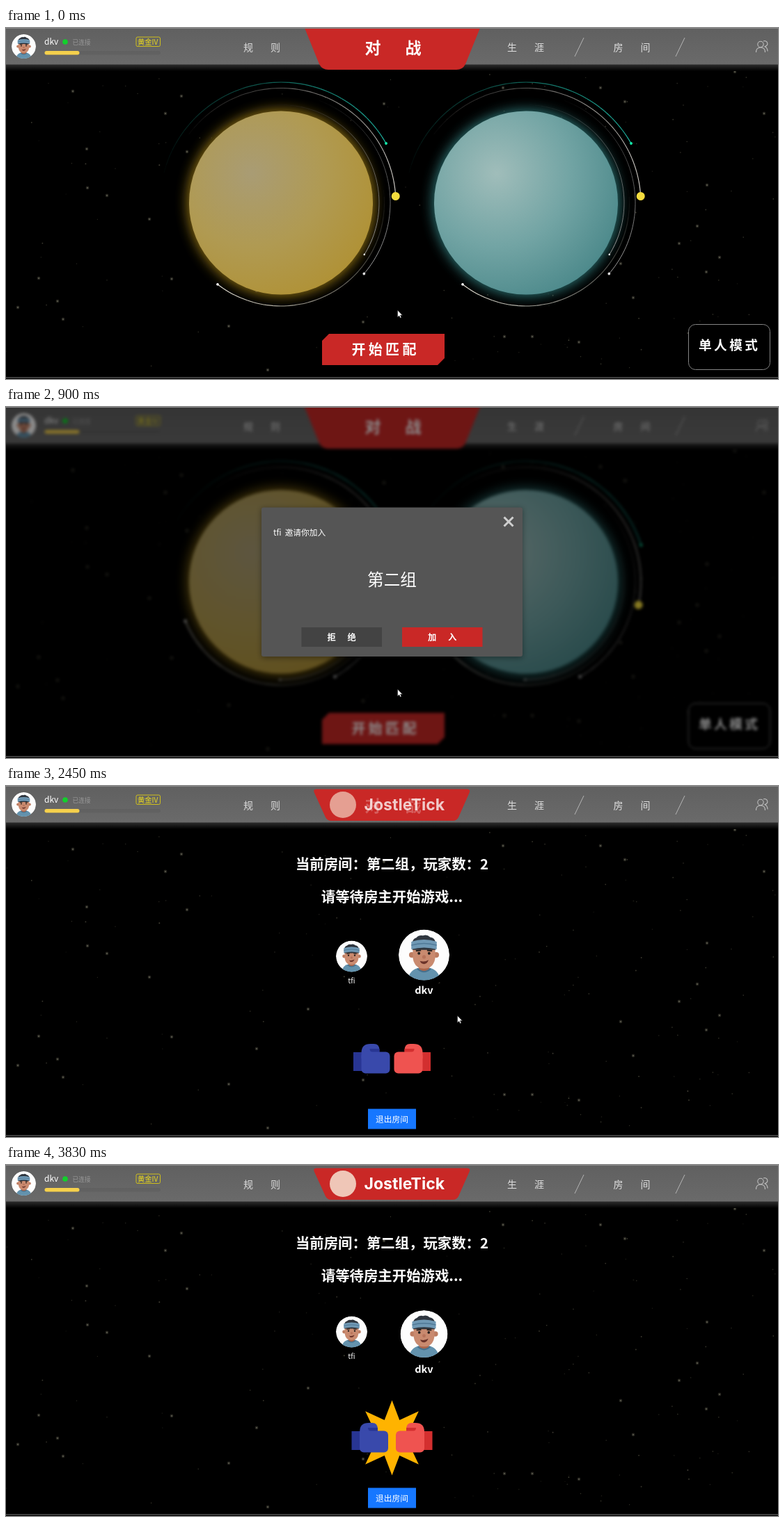
Recreate the animation shown at these times as an HTML page. Size 1109x505 px, loop 3880 ms.

```html
<!DOCTYPE html>
<html lang="zh-CN">
<head>
<meta charset="utf-8">
<title>对战大厅</title>
<style>
html, body { margin: 0; width: 100%; height: 100%; overflow: hidden; background: #000; }
svg { display: block; width: 1109px; height: 505px; }
text { font-family: "Noto Sans CJK SC", "Noto Sans CJK", "Noto Sans", sans-serif; fill: #fff; }
.bold { font-weight: 700; }
.mid { text-anchor: middle; }
.nav { font-size: 14px; font-weight: 300; fill: #dedede; letter-spacing: 25px; }
</style>
</head>
<body>
<svg id="stage" viewBox="0 0 1109 505" xmlns="http://www.w3.org/2000/svg"></svg>
<script>
const LOOP = 3880, OPEN = 600, ENTER = 2200;
const CX = 554.5, CY = 251.5;
const me = 'dkv', host = 'tfi', brand = 'JostleTick';
const RED = '#c92826';

const clamp = v => Math.max(0, Math.min(1, v));
const ramp = (t, from, length) => clamp((t - from) / length);
const easeOut = (u, power) => 1 - (1 - u) ** power;
const smooth = u => u * u * (3 - 2 * u);
const wave = (t, period) => (1 - Math.cos(2 * Math.PI * t / period)) / 2;

const text = (x, y, size, str, extra = '') =>
  `<text x="${x}" y="${y}" font-size="${size}" ${extra}>${str}</text>`;
const rect = (x, y, w, h, fill, extra = '') =>
  `<rect x="${x}" y="${y}" width="${w}" height="${h}" fill="${fill}" ${extra}/>`;
const circle = (x, y, r, fill, extra = '') =>
  `<circle cx="${x}" cy="${y}" r="${r}" fill="${fill}" ${extra}/>`;
const path = (d, extra) => `<path d="${d}" ${extra}/>`;
const polar = (r, deg) => {
  const a = deg * Math.PI / 180;
  return `${(r * Math.cos(a)).toFixed(2)} ${(r * Math.sin(a)).toFixed(2)}`;
};

// Background stars: the bright ones placed, the faint ones scattered.
const bright = [96,91, 229,123, 260,178, 206,275, 145,241, 434,321, 320,429, 714,86, 854,86,
  889,106, 1089,123, 993,285, 883,339, 716,444, 756,444, 513,423, 17,402, 74,393, 82,419,
  117,230, 116,174, 360,378, 1006,351, 1007,226, 823,452, 967,310, 238,361, 47,360, 252,98,
  543,109, 376,492, 901,388, 1047,63, 1025,330];
function stars() {
  let out = '', seed = 7;
  const rnd = () => (seed = seed * 16807 % 2147483647) / 2147483647;
  for (let i = 0; i < bright.length; i += 2) {
    const [x, y] = [bright[i], bright[i + 1]];
    out += circle(x, y, 2.4, '#8a8672', 'opacity=".25"') + circle(x, y, 0.8, '#8c8974');
  }
  for (let i = 0; i < 150; i++) {
    out += circle((rnd() * 1109).toFixed(1), (60 + rnd() * 440).toFixed(1),
      (0.5 + rnd() * 0.5).toFixed(2), '#7a7660', `opacity="${(0.2 + rnd() * 0.35).toFixed(2)}"`);
  }
  return out;
}

// Orbits: radius, starting angle, degrees per second, tail length, look of line and dot.
const orbits = [
  { r: 173.5, start: -29.5, speed: 13.1, tail: 136, line: '#1fb5a2', width: 1.2, dot: 2, fill: '#12e3a4' },
  { r: 165, start: -3.3, speed: 16.6, tail: 140, line: '#e0dcd6', width: 1.1, dot: 6, fill: '#f4dc3e' },
  { r: 157, start: 40.5, speed: 22.1, tail: 110, line: '#aaa', width: 0.9, dot: 1.9, fill: '#ddd' },
  { r: 148.5, start: 127.8, speed: 33.2, tail: 135, line: '#e8e4d8', width: 1.1, dot: 1.8, fill: '#fff' },
  { r: 141, start: 31.8, speed: 65.3, tail: 120, line: '#999', width: 0.9, dot: 1.3, fill: '#eee' }
];
function orbit(o, i) {
  const n = 36, step = o.tail / n;
  let out = '';
  for (let k = 0; k < n; k++) {
    out += path(`M${polar(o.r, -k * step)}A${o.r} ${o.r} 0 0 0 ${polar(o.r, -(k + 1) * step)}`,
      `fill="none" stroke="${o.line}" stroke-width="${o.width}" opacity="${(1 - k / n).toFixed(2)}"`);
  }
  return `<g class="orbit" data-i="${i}">${out}${circle(o.r, 0, o.dot, o.fill)}</g>`;
}
const planet = (x, id, glow) => `<g transform="translate(${x} ${CY})">
  ${circle(0, 0, 134, glow, 'filter="url(#glow)" opacity=".75"')}
  ${circle(0, 0, 132, `url(#${id})`)}${orbits.map(orbit).join('')}</g>`;
const planetFill = (id, a, b, c) => `<radialGradient id="${id}" cx=".34" cy=".34" r=".8">
  <stop stop-color="${a}"/><stop offset=".5" stop-color="${b}"/><stop offset="1" stop-color="${c}"/></radialGradient>`;

// Portrait in a 100-unit box, centred on the origin.
const portrait = `<g id="portrait" clip-path="url(#disc)">
  ${circle(0, 0, 50, '#fdfdfd')}
  ${path('M-32 54Q-31 29 -9 25H9Q31 29 32 54Z', 'fill="#6392ad"')}
  ${path('M-10 18H10V28Q0 36 -10 28Z', 'fill="#a9654b"')}
  ${path('M-13 27Q0 39 13 27', 'fill="none" stroke="#47708c" stroke-width="3"')}
  ${circle(-24, 0, 5.5, '#bd7c61')}${circle(24, 0, 5.5, '#bd7c61')}
  ${path('M-22 -16H22V6Q19 27 0 27Q-19 27 -22 6Z', 'fill="#c98a6f"')}
  ${path('M-23 -24Q-22 -32 -15 -34Q-10 -40 -2 -38Q6 -41 12 -35Q21 -34 23 -24V-10H-23Z', 'fill="#2f363f"')}
  ${path('M-25 -26Q0 -34 25 -26V-11Q0 -18 -25 -11Z', 'fill="#7099b5"')}
  ${path('M-25 -19Q0 -26 25 -19', 'fill="none" stroke="#4f7896" stroke-width="2"')}
  ${path('M-16 -8L-6 -9M6 -9L16 -8', 'stroke="#2c2623" stroke-width="3"')}
  ${circle(-10, -3, 2.7, '#221d1c')}${circle(10, -3, 2.7, '#221d1c')}
  ${circle(0, 4, 3.6, '#b8735a')}
  ${path('M-8 12Q1 15 9 10Q6 18 0 18Q-6 18 -8 12Z', 'fill="#6b3329"')}</g>`;
const face = (id, x, y, r) => `<use id="${id}" href="#portrait" transform="translate(${x} ${y}) scale(${r / 50})"/>`;

// Glove with its knuckles on x = 0, reaching to the left.
const glove = (id, main, dark) => `<g id="${id}">
  ${rect(-52.5, 383, 14, 27, dark)}
  ${path('M-41 392V384Q-41 371 -28 371H-23Q-15 371 -15 380V390Z', `fill="${main}"`)}
  ${rect(-41, 382.5, 41, 31, main, 'rx="6"')}
  ${path('M-29 378H-15V382.5H-25Q-29 382.5 -29 378Z', `fill="${dark}"`)}</g>`;
const burst = 'M' + Array.from({ length: 16 }, (_, i) => polar(i % 2 ? 0.51 : 1, i * 22.5 - 90)).join('L') + 'Z';

const header = `
  ${rect(-30, 52, 1169, 10, 'url(#under)')}
  ${rect(-30, -30, 1169, 82.5, 'url(#bar)')}
  ${face('small', 25.5, 26.5, 17.5)}
  ${text(55, 24, 12, me, 'font-weight="500"')}
  ${circle(85, 20, 3.8, '#12d02c')}
  ${text(95.5, 23.5, 8.7, '已连接', 'style="fill:#9a9a9a"')}
  ${rect(187, 13, 34.5, 13.5, 'none', 'rx="2" stroke="#d0c01c"')}
  ${text(189, 23.6, 10.3, '黄金IV', 'style="fill:#ecdb1e"')}
  ${rect(56, 33, 166, 5.5, '#000', 'rx="2.7" opacity=".06"')}
  ${rect(55.5, 33, 50, 5.5, '#f5d04c', 'rx="2.7"')}
  ${text(341, 33, 14, '规则', 'class="nav"')}
  ${text(720, 33, 14, '生涯', 'class="nav"')}
  ${text(872.5, 33, 14, '房间', 'class="nav"')}
  ${path('M830 14L817 41M975 14L962 41', 'stroke="#b4b4b4"')}
  <g transform="translate(1086 27)" fill="none" stroke="#c0c0c0" stroke-width="1.1">
    ${path('M-8.5 8Q-8.5 1 -2 1Q4.500 1 4.500 8M2 -8A4 4 0 1 1 3.500 -0.500Q8 1 8 6.500', '')}
    ${circle(-2, -3.5, 4.2, 'none')}</g>
  ${path('M429 -30V0L450 52Q454 60 463 60H647Q656 60 660 52L681 0V-30Z', `id="wideTab" fill="${RED}"`)}
  ${path('M446 4.5H662Q668 4.5 665.5 10L650 45Q647.5 50 642 50H467Q461.5 50 459 45L443 10Q440.5 4.5 446 4.5Z',
    `id="slimTab" fill="${RED}"`)}
  ${text(515.5, 36.7, 23, '对战', 'id="tabText" class="bold" letter-spacing="35"')}
  <g id="brand">${circle(484, 27, 19, '#efc6b7')}
  ${text(514.5, 35, 23, brand, 'class="bold" style="font-family:Inter,sans-serif"')}</g>`;

const battle = `<g id="battle">
  ${planet(395, 'gold', '#c39a1e')}${planet(747, 'teal', '#3d9c9c')}
  ${path('M464 440H630V475L620 485H454V450Z', `fill="${RED}"`)}
  ${text(496.5, 470.3, 20, '开始匹配', 'class="bold" letter-spacing="4.3"')}
  ${rect(980.5, 426.5, 117, 65, '#000', 'rx="10" stroke="#848484"')}
  ${text(995, 463, 18.7, '单人模式', 'class="bold" letter-spacing="3.4"')}</g>`;

const room = `<g id="room">
  ${text(CX, 119.5, 20.4, '当前房间：第二组，玩家数：2', 'class="bold mid"')}
  ${text(CX, 166.5, 20.4, '请等待房主开始游戏...', 'class="bold mid"')}
  <g id="guest">${face('hostFace', 496.5, 0, 22.5)}${text(496.5, 39.5, 10.5, host, 'class="mid"')}</g>
  ${face('myFace', 600.5, 243, 36)}
  ${text(600.5, 298.5, 14.5, me, 'class="bold mid"')}
  ${path(burst, 'id="burst" fill="#ffb300"')}
  ${glove('blue', '#3949ab', '#283593')}${glove('red', '#ef5350', '#d32f2f')}
  ${rect(520, 464.5, 69, 29, '#1677ff')}
  ${text(CX, 484, 11.7, '退出房间', 'class="mid"')}</g>`;

const modal = `<g id="modal">
  ${rect(367, 146, 375, 215, '#000', 'filter="url(#soft)" opacity=".4"')}
  ${rect(367, 144.5, 375, 214.5, '#555', 'rx="3"')}
  ${text(384, 185, 11.7, host + '&#160; 邀请你加入', 'xml:space="preserve"')}
  ${path('M715.5 158.5L728.5 171.5M728.5 158.5L715.5 171.5', 'stroke="#cfcfcf" stroke-width="3"')}
  ${text(CX, 257, 23.6, '第二组', 'class="mid"')}
  ${rect(424.5, 317, 115.5, 28, '#434343')}
  ${rect(569, 317, 115.5, 28, RED, 'id="join"')}
  ${text(461.5, 336, 12.3, '拒绝', 'class="bold" letter-spacing="16.7"')}
  ${text(606, 336, 12.3, '加入', 'class="bold" letter-spacing="16.7"')}</g>`;

document.getElementById('stage').innerHTML = `<defs>
  <clipPath id="disc"><circle r="50"/></clipPath>
  <filter id="glow" x="-30%" y="-30%" width="160%" height="160%"><feGaussianBlur stdDeviation="9"/></filter>
  <filter id="soft" x="-10%" y="-10%" width="120%" height="120%"><feGaussianBlur stdDeviation="4"/></filter>
  <linearGradient id="bar" x2="0" y2="1"><stop offset=".36" stop-color="#606060"/><stop offset="1" stop-color="#6a6a6a"/></linearGradient>
  <linearGradient id="under" x2="0" y2="1"><stop stop-color="#303030"/><stop offset="1" stop-color="#000"/></linearGradient>
  <radialGradient id="click"><stop stop-color="#c9a0a0"/><stop offset=".6" stop-color="#b9686c"/><stop offset="1" stop-color="#b3232f"/></radialGradient>
  ${planetFill('gold', '#a99c74', '#b09a52', '#b09030')}
  ${planetFill('teal', '#a0bdba', '#72a4a4', '#458486')}
  ${portrait}</defs>
  ${rect(0, 0, 1109, 505, '#000')}
  <g id="page">${stars()}${battle}${room}${header}</g>
  ${rect(0, 0, 1109, 505, '#000', 'id="mask"')}
  ${modal}
  ${rect(0, 0, 1109, 1, '#858585')}${rect(0, 502, 1109, 2, '#3e3e3e')}
  ${circle(648.5, 331.5, 14.5, 'url(#click)', 'id="ripple" opacity=".85"')}
  <g id="cursor">${path('M0 0V10L2.3 8L3.9 11.3L5.5 10.6L4 7.2H7Z',
    'fill="#fff" stroke="#222" stroke-width=".6"')}</g>`;

const el = {};
document.querySelectorAll('[id]').forEach(e => el[e.id] = e);
const rings = [...document.querySelectorAll('.orbit')];
const show = (e, on) => { e.style.display = on ? '' : 'none'; };
const move = (e, value) => e.setAttribute('transform', value);
const fade = (e, value) => e.setAttribute('opacity', value);

function mix(a, b, u) {
  return `rgb(${a.map((v, i) => Math.round(v + (b[i] - v) * u)).join()})`;
}

function drawBattle(t) {
  for (const ring of rings) {
    const o = orbits[ring.dataset.i];
    move(ring, `rotate(${o.start + o.speed * t / 1000})`);
  }
}

function drawModal(t) {
  const open = t > OPEN && t < ENTER;
  const dim = open ? ramp(t, OPEN, 200) : 0;
  const zoom = easeOut(dim, 4.3);
  show(el.modal, open);
  fade(el.modal, zoom);
  move(el.modal, `translate(${CX} ${CY}) scale(${0.2 + 0.8 * zoom}) translate(${-CX} ${-CY})`);
  fade(el.mask, 0.45 * dim);
  el.page.style.filter = dim ? `blur(${2 * dim}px)` : 'none';
  el.join.setAttribute('fill', t < 2050
    ? mix([201, 40, 38], [119, 119, 119], ramp(t, 1290, 100))
    : mix([119, 119, 119], [67, 67, 67], ramp(t, 2050, 50)));
}

function drawRoom(t) {
  const since = t - ENTER - 40;
  move(el.guest, `translate(0 ${245.45 - 6.6 * wave(since, 2500)})`);
  const r = 35.76 + 1.77 * Math.sin(Math.PI * (t - 2450) / 1000 + 0.436);
  move(el.myFace, `translate(600.5 243) scale(${r / 50})`);

  // One punch per second; the burst swells while the gloves recoil.
  const beat = (t + 170) % 1000 / 1000;
  const gap = 3 + 2.5 * (1 - smooth(ramp(beat, 0.35, 0.25)) + smooth(ramp(beat, 0.75, 0.2)));
  show(el.burst, beat < 0.4);
  move(el.burst, `translate(${CX} 392.5) scale(${54 + 6 * wave(beat, 0.4)})`);
  move(el.blue, `translate(${CX - gap} 0)`);
  move(el.red, `translate(${CX + gap} 0) scale(-1 1)`);
}

function draw(t) {
  const inRoom = t >= ENTER;
  show(el.battle, !inRoom);
  show(el.room, inRoom);
  show(el.wideTab, !inRoom);
  show(el.slimTab, inRoom);
  const swap = easeOut(ramp(t, ENTER, 500), 2);
  fade(el.tabText, 1 - swap);
  fade(el.brand, swap);
  inRoom ? drawRoom(t) : drawBattle(t);
  drawModal(t);

  const go = smooth(ramp(t, 1040, 310));
  move(el.cursor, `translate(${562.5 + 86 * go} ${406 - 75.5 * go})`);
  show(el.cursor, t < 3810);
  show(el.ripple, t > 2060 && t < ENTER);
}

function frame() {
  draw(performance.now() % LOOP);
  requestAnimationFrame(frame);
}
frame();
</script>
</body>
</html>
```
